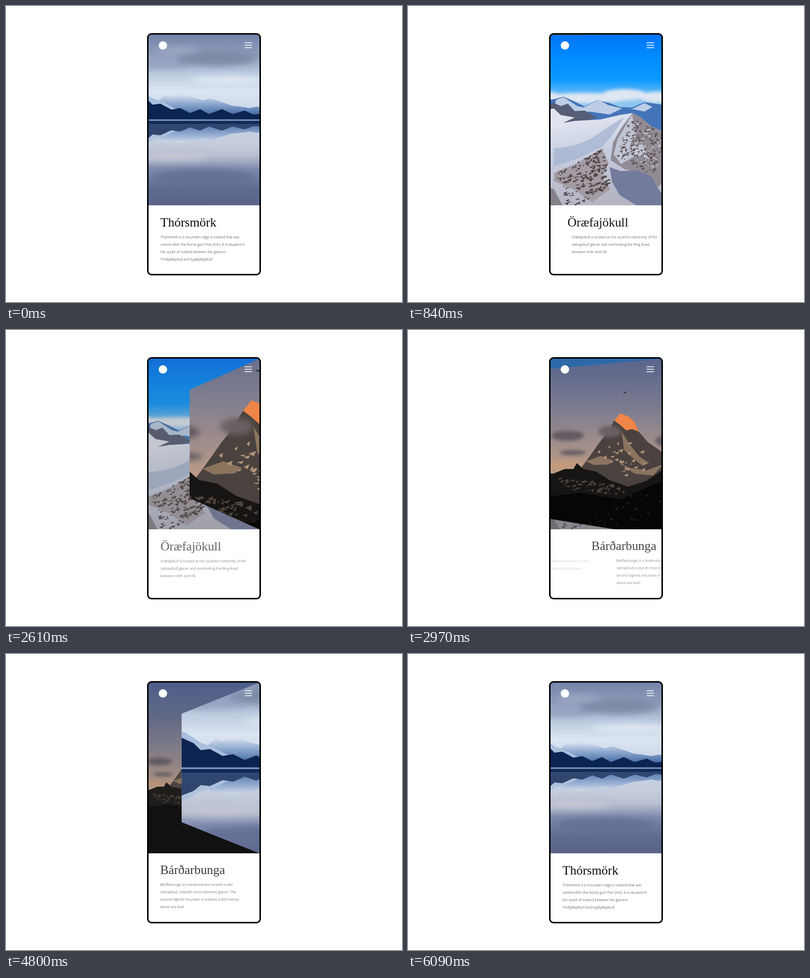
Animation of 800x600 px, one loop 6.12 s. Source, as an HTML page:

```html
<!DOCTYPE html>
<html lang="en">
<head>
<meta charset="utf-8">
<title>Mountain slider</title>
<style>
html, body { margin: 0; width: 100%; height: 100%; overflow: hidden; background: #fff; }
svg { display: block; width: 800px; height: 600px; }
.title { font: 25.4px "Liberation Serif", serif; fill: #0a0a0a; }
.desc { font: 300 7.15px "Open Sans", sans-serif; fill: #1c1c1c; }
</style>
</head>
<body>
<svg viewBox="0 0 800 600">
<defs>
  <clipPath id="screen"><rect x="287" y="57" width="226" height="487" rx="7"/></clipPath>
  <clipPath id="window"><rect x="288" y="58" width="224" height="346"/></clipPath>
  <clipPath id="wipe"><polygon id="edge"/></clipPath>
  <filter id="soft" x="-50%" y="-50%" width="200%" height="200%"><feGaussianBlur stdDeviation="6"/></filter>
  <filter id="haze" x="-50%" y="-50%" width="200%" height="200%"><feGaussianBlur stdDeviation="3"/></filter>
  <linearGradient id="lakeSky" gradientUnits="userSpaceOnUse" x1="0" y1="58" x2="0" y2="404">
    <stop offset="0" stop-color="#7585ab"/><stop offset=".12" stop-color="#909bb9"/>
    <stop offset=".23" stop-color="#bccbe0"/><stop offset=".33" stop-color="#dbe4f0"/>
    <stop offset=".5" stop-color="#c3d1e6"/><stop offset=".63" stop-color="#c5cddd"/>
    <stop offset=".71" stop-color="#b9bfd0"/><stop offset=".79" stop-color="#7d89ac"/>
    <stop offset=".9" stop-color="#606b90"/><stop offset="1" stop-color="#59638a"/>
  </linearGradient>
  <linearGradient id="lakeSnow" gradientUnits="userSpaceOnUse" x1="0" y1="178" x2="0" y2="228">
    <stop offset="0" stop-color="#dbe4f0"/><stop offset=".4" stop-color="#8ea9d0"/><stop offset="1" stop-color="#2b5596"/>
  </linearGradient>
  <linearGradient id="blueSky" gradientUnits="userSpaceOnUse" x1="0" y1="58" x2="0" y2="190">
    <stop offset="0" stop-color="#0074f8"/><stop offset=".35" stop-color="#008bff"/>
    <stop offset=".7" stop-color="#0c9aff"/><stop offset="1" stop-color="#8cc6f0"/>
  </linearGradient>
  <linearGradient id="slope" gradientUnits="userSpaceOnUse" x1="300" y1="225" x2="330" y2="404">
    <stop offset="0" stop-color="#e4e8f2"/><stop offset=".45" stop-color="#c6cde0"/><stop offset="1" stop-color="#b4b4c2"/>
  </linearGradient>
  <linearGradient id="duskSky" gradientUnits="userSpaceOnUse" x1="0" y1="58" x2="0" y2="270">
    <stop offset="0" stop-color="#4d5f92"/><stop offset=".3" stop-color="#616a8c"/>
    <stop offset=".6" stop-color="#817f90"/><stop offset="1" stop-color="#bd9c85"/>
  </linearGradient>

  <g id="lake">
    <rect x="150" y="58" width="400" height="346" fill="url(#lakeSky)"/>
    <g filter="url(#soft)">
      <ellipse cx="425" cy="107" rx="80" ry="15" fill="#76859f" opacity=".75"/>
      <ellipse cx="310" cy="120" rx="65" ry="8" fill="#8796b7" opacity=".6"/>
      <ellipse cx="450" cy="150" rx="80" ry="7" fill="#edf2f8" opacity=".7"/>
      <ellipse cx="345" cy="90" rx="45" ry="9" fill="#a4afc8" opacity=".6"/>
      <ellipse cx="400" cy="345" rx="100" ry="14" fill="#616c92" opacity=".7"/>
      <ellipse cx="330" cy="308" rx="80" ry="6" fill="#cfd0d7" opacity=".7"/>
    </g>
    <g id="range">
      <path d="M285 205L308 192 322 180 334 184 346 180 368 182 384 187 398 191 412 187 440 196 456 202 474 204 492 207 506 204 550 210V231H285Z" fill="url(#lakeSnow)"/>
      <path d="M150 100L215 138 245 157 272 171 296 187 318 195 350 212 380 225V231H150Z" fill="#a9bfdd"/>
      <path d="M150 118L230 163 245 160 262 178 284 188 296 200 312 198 334 210 352 207 372 217 392 209 410 219 436 209 458 219 482 212 500 220 550 215V231H150Z" fill="#0b2452"/>
    </g>
    <use href="#range" transform="matrix(1 0 0 -.85 0 430.4)" opacity=".8"/>
    <rect x="150" y="228" width="400" height="11" fill="#102c5c"/>
    <rect x="150" y="230" width="400" height="2.6" fill="#8b9dc0"/>
  </g>

  <g id="snow">
    <rect x="150" y="58" width="400" height="346" fill="url(#blueSky)"/>
    <g filter="url(#haze)" fill="#dfe7f2">
      <ellipse cx="350" cy="187" rx="90" ry="10"/><ellipse cx="430" cy="180" rx="45" ry="11"/>
      <ellipse cx="500" cy="185" rx="40" ry="11"/><ellipse cx="240" cy="182" rx="60" ry="10"/>
    </g>
    <path d="M150 200L230 186 285 190 308 184 330 194 350 204 375 191 400 197 420 205 445 206 470 195 490 198 512 201 550 194V262H150Z" fill="#4474b8"/>
    <path d="M293 190L308 185 335 203 348 206 378 190 397 201 425 208 400 220 360 214 320 220 288 206ZM445 209L470 197 486 205 470 214Z" fill="#bccde6"/>
    <path d="M150 225L288 197 303 203 316 198 330 213 350 212 374 226 340 237 288 240 150 250Z" fill="#565d76"/>
    <path d="M150 228L288 208 302 221 330 226 300 240 150 250Z" fill="#dfe4ef"/>
    <path d="M150 254L288 240 330 233 382 230 420 221 446 217 463 226 482 243 512 259 550 270V404H150Z" fill="url(#slope)"/>
    <path d="M288 288Q340 285 374 261T430 225L405 262 385 285 340 307 288 325Z" fill="#a6b4d0" opacity=".75"/>
    <path d="M446 217L463 226 482 243 550 270V370L512 355 486 372 465 338 430 330 402 312 407 276 424 246Z" fill="#918b94"/>
    <path d="M445 220L453 254 440 285 466 280 480 310 456 300 423 320 408 300 416 270Z" fill="#bfc5d5"/>
    <path d="M400 326L422 334 455 332 484 345 500 373 512 389 550 390V404H455L420 382 405 356Z" fill="#737b9c"/>
    <path d="M288 338L335 318 385 288 398 318 385 350 402 370 365 397 330 372 288 354Z" fill="#a49ca3"/>
    <path d="M150 340L288 370 306 404H150Z" fill="#86808a"/>
    <path id="leftRock" fill="#4d4547"/><path id="rightRock" fill="#5d5152"/><path id="rightSnow" fill="#c6c8d3"/>
  </g>

  <g id="dusk">
    <rect x="150" y="58" width="400" height="346" fill="url(#duskSky)"/>
    <g filter="url(#haze)" fill="#645c64">
      <ellipse cx="310" cy="218" rx="25" ry="8"/><ellipse cx="318" cy="244" rx="20" ry="4"/>
      <ellipse cx="465" cy="226" rx="22" ry="9"/><ellipse cx="300" cy="262" rx="30" ry="5" fill="#c79a7b"/>
    </g>
    <path d="M327 272L344 249 358 229 370 214 381 195 390 184 403 189 412 197 418 212 432 228 448 239 466 254 500 275V320H327Z" fill="#4a423f"/>
    <path d="M381 195L390 184 403 189 412 197 418 212 408 208 399 210 390 202Z" fill="#ef8548"/>
    <ellipse cx="374" cy="212" rx="17" ry="9" fill="#6b6163" filter="url(#haze)"/>
    <path d="M392 212L405 232 419 250 434 260 424 264 409 252 396 240ZM338 257L360 249 380 256 372 262 350 263ZM396 266L430 271 455 262 440 279 412 276Z" fill="#a18469" opacity=".75"/>
    <path id="ledges" fill="#b2947a"/>
    <path d="M150 268L288 276 306 269 319 269 324 260 334 269 354 273 374 286 402 296 430 287 455 270 472 252 488 228 512 205 550 185V404H150Z" fill="#171414"/>
    <path id="scree" fill="#52473f"/>
    <path d="M150 325L288 310 330 305 390 315 440 293 490 278 550 250V404H150Z" fill="#070606"/>
    <path id="trees" fill="#292320"/>
    <path d="M394 151l3 1 3-1-2 2-2 0z" fill="#20222c"/>
  </g>
</defs>

<g clip-path="url(#screen)">
  <g clip-path="url(#window)">
    <use id="back"/>
    <rect id="shade" x="288" y="58" width="224" height="346" fill="#5a5a5a"/>
    <g clip-path="url(#wipe)"><use id="front"/></g>
  </g>
  <circle cx="317" cy="80" r="8.5" fill="#fff"/>
  <path d="M482 74.5H497M482 79.5H497M482 84.5H497" stroke="#fff" stroke-width="1.4"/>
  <g id="copy"></g>
</g>
<rect x="286.5" y="56.5" width="227" height="488" rx="7.5" fill="none" stroke="#000" stroke-width="3"/>
</svg>

<script>
const LOOP = 6120;
const $ = id => document.getElementById(id);
const clamp = v => Math.min(1, Math.max(0, v));
const smooth = v => (v = clamp(v), v * v * (3 - 2 * v));

const places = [
  { photo: 'lake', zoom: .17, x: 312, dy: 0, title: 'Thórsmörk', lines: [
    'Thórsmörk is a mountain ridge in Iceland that was',
    'named after the Norse god Thor (Þór). It is situated in',
    'the south of Iceland between the glaciers',
    'Tindfjallajökull and Eyjafjallajökull.'] },
  { photo: 'snow', zoom: .1, x: 312, dy: 0, title: 'Öræfajökull', lines: [
    'Öræfajökull is located at the southern extremity of the',
    'Vatnajökull glacier and overlooking the Ring Road',
    'between Höfn and Vík.'] },
  { photo: 'dusk', zoom: .9, x: 311.4, dy: -.7, title: 'Bárðarbunga', lines: [
    'Bárðarbunga, is a stratovolcano located under',
    'Vatnajökull, Iceland’s most extensive glacier. The',
    'second highest mountain in Iceland, 2,009 metres',
    'above sea level.'] }
];

// start: when the new copy appears; lead: how much earlier its photo sets off
const steps = [
  { place: places[0], start: -1057, lead: 900 },
  { place: places[1], start: 480, lead: 480 },
  { place: places[2], start: 2800, lead: 600 },
  { place: places[0], start: 5063, lead: 900 }
];

function svg(tag, parent, attrs, text) {
  const el = document.createElementNS('http://www.w3.org/2000/svg', tag);
  for (const k in attrs) el.setAttribute(k, attrs[k]);
  if (text) el.textContent = text;
  return parent.appendChild(el);
}

for (const p of places) {
  p.head = svg('text', $('copy'), { class: 'title', x: p.x, y: 447 + p.dy }, p.title);
  p.body = svg('g', $('copy'), { class: 'desc' });
  p.lines.forEach((line, i) => svg('text', p.body, { x: p.x, y: 470.6 + p.dy + 15 * i }, line));
}

// Scatter small slanted chips over a parallelogram: corner, two sides
let seed = 7;
const rnd = () => (seed = seed * 16807 % 2147483647) / 2147483647;
function scatter(id, n, size, [x, y], [ax, ay], [bx, by]) {
  let d = '';
  while (n--) {
    const u = rnd(), v = rnd(), w = size * (.4 + rnd()), h = size * (.3 + rnd() * .7);
    d += `M${(x + ax * u + bx * v).toFixed(1)} ${(y + ay * u + by * v).toFixed(1)}`
       + `l${w.toFixed(1)} ${(-h * .5).toFixed(1)} ${(-w * .3).toFixed(1)} ${h.toFixed(1)}z`;
  }
  $(id).setAttribute('d', d);
}
scatter('leftRock', 190, 7, [290, 338], [90, -48], [22, 75]);
scatter('rightRock', 200, 6, [440, 224], [72, 38], [-28, 82]);
scatter('rightSnow', 70, 5, [446, 230], [66, 36], [-20, 70]);
scatter('ledges', 28, 6, [345, 246], [50, -26], [50, 40]);
scatter('scree', 70, 5, [290, 282], [90, 10], [20, 18]);
scatter('trees', 70, 4, [330, 335], [165, -75], [12, 45]);

function show(el, dx, alpha) {
  el.setAttribute('transform', `translate(${dx.toFixed(2)} 0)`);
  el.setAttribute('opacity', alpha.toFixed(3));
}

function photo(el, name) {
  if (el.getAttribute('href') !== '#' + name) el.setAttribute('href', '#' + name);
}

function draw(t) {
  let i = steps.length - 1;
  while (i && t < steps[i].start - steps[i].lead) i--;
  const { place, start, lead } = steps[i];
  const prev = steps[(i + 2) % 3].place;
  const u = t - start;
  const rest = (1 - clamp(u / 600)) ** 3;

  for (const p of places) { show(p.head, 0, 0); show(p.body, 0, 0); }
  const out = smooth((u + 120) / 350);
  show(prev.head, -70 * out, 1 - clamp((u + 340) / 400));
  show(prev.body, -130 * out, 1 - clamp((u + 340) / 730));
  const alpha = (1 - rest) ** .63;
  show(place.head, 162 * rest, alpha);
  show(place.body, 300 * rest, alpha);

  photo($('back'), prev.photo);
  photo($('front'), place.photo);
  $('shade').setAttribute('opacity', .5 * clamp((u + 400) / 500));

  const left = 512 - 224 * smooth((u + lead) / (lead + 100));
  const inset = Math.max(0, 66 * rest - 3);
  const foot = Math.max(left, 288 + 224 * Math.min(1, rest * 1.6));
  $('edge').setAttribute('points',
    `${left},${58 + inset} 512,58 512,404 ${foot},404 ${left},${404 - inset}`);
  const s = 1 + place.zoom * rest;
  $('front').setAttribute('transform',
    `translate(${400 + 115 * rest} 230) scale(${s}) translate(-400 -230)`);
}

const t0 = performance.now();
function tick() {
  draw((performance.now() - t0) % LOOP);
  requestAnimationFrame(tick);
}
tick();
</script>
</body>
</html>
```
